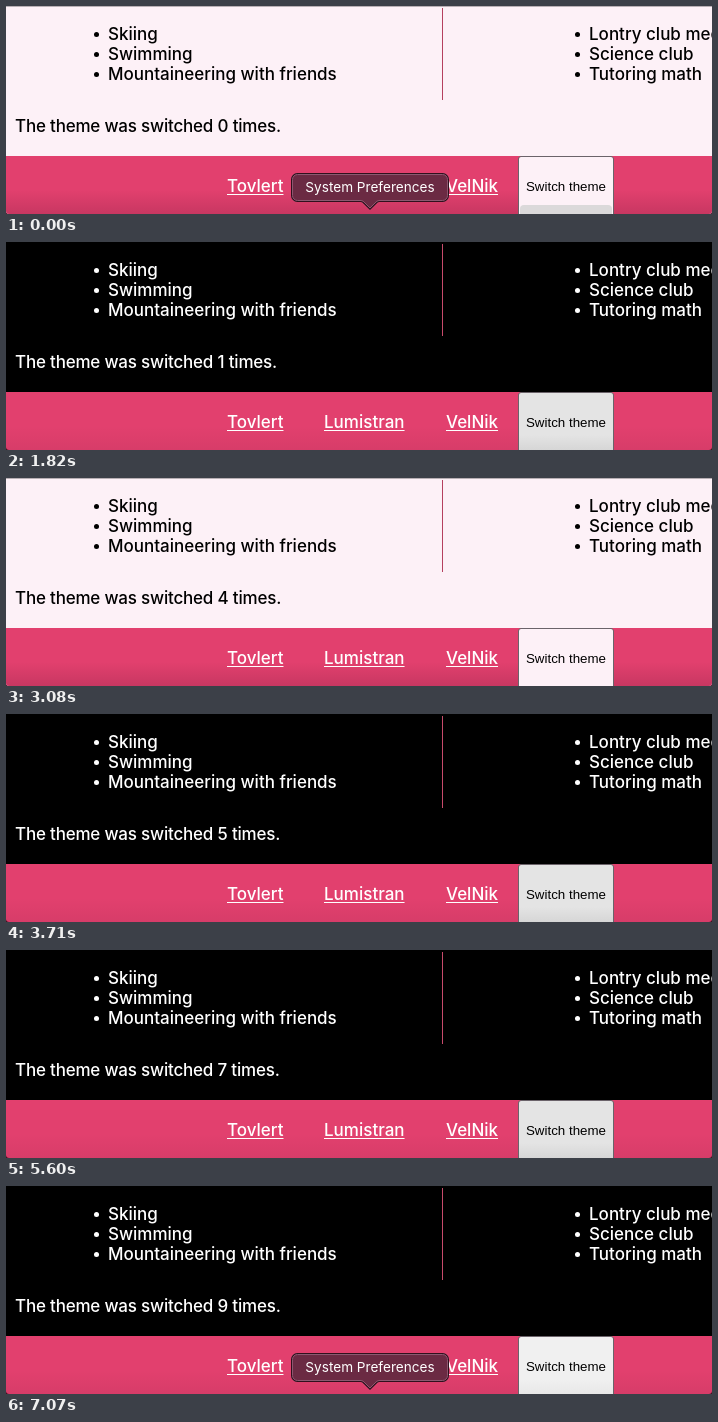
An HTML page that plays this animation: 706 by 208 pixels, repeating every 7.14 s.

```html
<!DOCTYPE html>
<html lang="en">
<head>
<meta charset="utf-8">
<title>Theme switcher</title>
<style>
  html, body { margin: 0; width: 100%; height: 100%; overflow: hidden; }
  html { background: #35121f; }
  body {
    --page: #fdf1f7; --ink: #000; --rule: #b5405f; --shade: .14; --edge: #b9b0b5;
    --button: #fdf1f7; --base: #fdf1f7;
    position: relative;
    border-radius: 0 0 3px 3px;
    background: var(--page);
    color: var(--ink);
    font: 500 17px/20px Inter, sans-serif;
    white-space: nowrap;
  }
  body.dark {
    --page: #000; --ink: #fff; --rule: #c84b6c; --shade: .06; --edge: transparent;
    --button: #f0f0f0; --base: #e8e8e8;
  }
  body.dark.hover { --button: #e4e4e4; --base: #d6d6d6; }
  body::before {
    content: ""; position: absolute; inset: 0 0 auto; height: 1px; background: var(--edge);
  }
  ul { position: absolute; top: 18px; margin: 0; padding: 0; list-style: none; }
  li { position: relative; height: 20px; }
  li::before {
    content: ""; position: absolute; left: -14px; top: 8px;
    width: 5px; height: 5px; border-radius: 50%; background: var(--ink);
  }
  .left { left: 102px; }
  .right { left: 583px; }
  .rule { position: absolute; left: 436px; top: 2px; width: 1px; height: 92px; background: var(--rule); }
  p { position: absolute; left: 9px; top: 110px; margin: 0; letter-spacing: -.2px; }
  footer { position: absolute; inset: 150px 0 0; overflow: hidden; background: #e2406e; }
  footer::before {
    content: ""; position: absolute; inset: 34px 0 0;
    background: linear-gradient(transparent, rgba(40, 0, 20, var(--shade)));
  }
  .link {
    position: absolute; top: 20px; color: #fff;
    text-decoration: underline; text-decoration-thickness: 1px; text-underline-offset: 2px;
  }
  .button {
    position: absolute; left: 512px; top: 0; box-sizing: border-box; width: 96px; height: 62px;
    border: 1px solid #6b636a; border-radius: 3px;
    background: linear-gradient(var(--button) 70%, var(--base) 95%);
    color: #000; font: 13.333px/59px "Liberation Sans", Arial, sans-serif;
    text-align: center;
  }
  .dock {
    position: absolute; left: 514px; top: 49px; width: 92px; height: 12px;
    border-radius: 4px 4px 0 0; background: #dbd9da; visibility: hidden;
  }
  .tip { position: absolute; left: 284px; top: 166px; visibility: hidden; }
  .tip path { fill: #6b2a43; stroke: #8d5870; }
  .tip .outline { stroke: #30101d; stroke-width: 3; }
  .tip text { fill: #fff; font: 13.6px Inter, sans-serif; }
  .docked .dock, .tipped .tip { visibility: visible; }
</style>
</head>
<body class="docked tipped">
  <ul class="left"><li>Skiing</li><li>Swimming</li><li>Mountaineering with friends</li></ul>
  <div class="rule"></div>
  <ul class="right"><li>Lontry club meetings</li><li>Science club</li><li>Tutoring math</li></ul>
  <p>The theme was switched <span id="count">0</span> times.</p>
  <footer>
    <span class="link" style="left:221px">Tovlert</span>
    <span class="link" style="left:318px">Lumistran</span>
    <span class="link" style="left:440px">VelNik</span>
    <div class="button">Switch theme</div>
    <div class="dock"></div>
  </footer>
  <svg class="tip" width="160" height="42">
    <defs>
      <path id="bubble" d="M7.5 2.5H152.5a5 5 0 0 1 5 5V23.5a5 5 0 0 1 -5 5H89Q87 28.5 85 31L80 36L75 31Q73 28.5 71 28.5H7.5a5 5 0 0 1 -5 -5V7.5a5 5 0 0 1 5 -5Z"/>
    </defs>
    <use href="#bubble" class="outline" style="stroke:#30101d"/>
    <path class="outline" d="M7.5 2.5H152.5a5 5 0 0 1 5 5V23.5a5 5 0 0 1 -5 5H89Q87 28.5 85 31L80 36L75 31Q73 28.5 71 28.5H7.5a5 5 0 0 1 -5 -5V7.5a5 5 0 0 1 5 -5Z"/>
    <use href="#bubble"/>
    <text x="80" y="20" text-anchor="middle">System Preferences</text>
  </svg>
<script>
  const LOOP = 7140;
  const switches = [1260, 1890, 2520, 3080, 3500, 4410, 5110, 5670, 6230];
  const count = document.getElementById("count");
  const flag = (name, on) => document.body.classList.toggle(name, on);

  function draw() {
    const t = performance.now() % LOOP;
    const n = switches.filter(s => t >= s).length;
    count.textContent = n;
    flag("dark", n % 2 === 1);
    flag("hover", t >= 980 && t < 6510);
    flag("docked", t < 980);
    flag("tipped", t < 70 || t >= 6580);
    requestAnimationFrame(draw);
  }
  draw();
</script>
</body>
</html>
```
